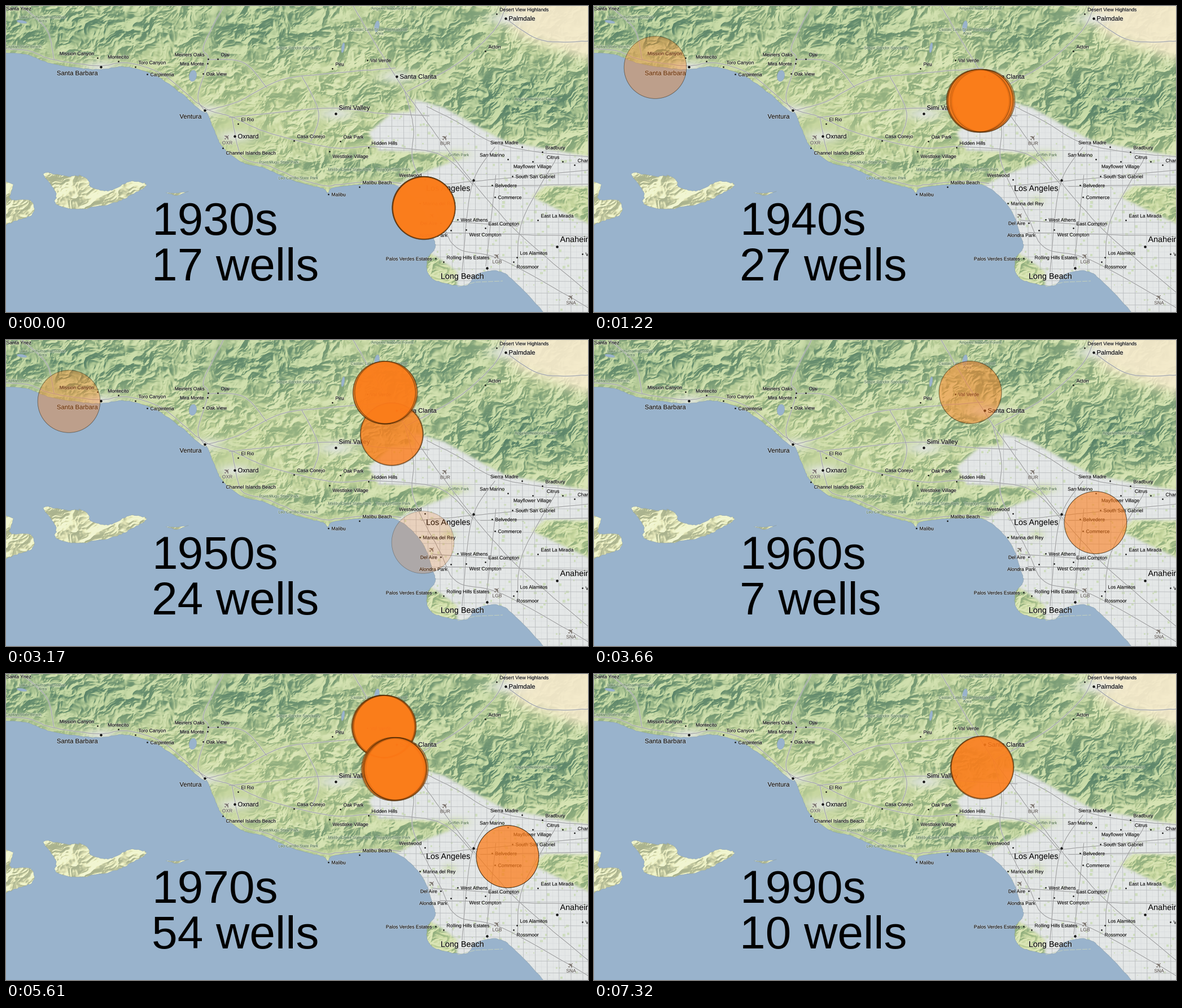
Write a matplotlib script that moves like this. It is 1031x543 px and loops after 8 s.

```python
import numpy as np
import matplotlib.pyplot as plt
from matplotlib.animation import FuncAnimation
from matplotlib.collections import LineCollection, PatchCollection
from matplotlib.patches import Circle, Ellipse, PathPatch
from matplotlib.path import Path
from matplotlib.patheffects import withStroke

W, H, DPI = 1031, 543, 72
TICK, HOLD, TICKS = 20, 61, 400
SEA, SHORE = "#99b3cc", "#8fa5b4"
rng = np.random.default_rng(11)
plt.rcParams["font.family"] = "Liberation Sans"

# Key points only; curves and wobble fill in the rest.
COAST = [
    (-20, 83), (35, 86), (80, 102), (160, 113), (212, 108), (275, 129),
    (346, 186), (356, 190), (368, 218), (384, 251), (420, 278), (458, 288),
    (515, 312), (561, 324), (570, 332), (582, 322), (650, 316), (695, 320),
    (736, 358), (757, 411), (760, 430), (747, 447), (746, 471), (763, 488),
    (808, 497), (823, 490), (832, 477), (870, 470), (901, 489), (958, 550),
]
ISLANDS = [
    [(67, 297), (108, 302), (132, 301), (146, 309), (152, 322), (185, 327),
     (220, 311), (249, 318), (220, 336), (190, 350), (125, 360), (88, 351), (88, 330)],
    [(-15, 318), (12, 317), (8, 342), (44, 345), (47, 369), (12, 383), (-15, 388)],
    [(284, 331), (304, 332), (323, 329), (303, 336)],
]
URBAN = [
    (642, 225), (682, 190), (725, 187), (722, 165), (775, 180), (850, 222),
    (885, 240), (1040, 268), (1040, 320), (955, 318), (930, 338), (1040, 390),
    (1040, 560), (800, 560), (798, 470), (765, 446), (680, 400), (690, 318),
    (725, 300), (810, 268), (770, 260), (660, 256),
]
DESERT = [(858, -30), (900, 52), (1060, 105), (1060, -30)]

HILL_ROADS = [
    [(x + 3, y - 7) for x, y in COAST[:7]] + [(400, 197), (465, 225), (575, 251), (640, 249)],
    [(352, 186), (410, 170), (485, 132), (570, 120), (690, 110)],
    [(395, 198), (470, 190), (580, 181), (660, 190), (750, 195)],
    [(615, 0), (656, 70), (706, 150)],
    [(710, 152), (800, 102), (864, 44), (886, 0)],
    [(352, 186), (340, 160), (358, 95), (350, 72), (385, 0)],
    [(358, 95), (420, 100), (462, 145)],
    [(85, 95), (72, 42), (28, 0)],
    [(524, 124), (554, 189), (540, 240)],
    [(884, 22), (950, 61), (1040, 62)],
    [(400, 197), (412, 255)] + [(x + 5, y - 5) for x, y in COAST[10:18] if x != 570],
]
CITY_ROADS = [
    [(706, 150), (778, 250), (850, 340), (920, 414), (1040, 515)],
    [(706, 150), (722, 215), (722, 280), (769, 376), (800, 430), (880, 451), (1040, 540)],
    [(640, 249), (765, 262), (828, 318)],
    [(745, 178), (800, 206), (860, 241), (940, 259), (1040, 268)],
    [(735, 320), (840, 310), (1040, 290)], [(866, 250), (825, 320), (808, 472)],
    [(868, 300), (850, 462)], [(974, 272), (915, 380), (906, 462)],
    [(768, 402), (1040, 409)], [(755, 380), (907, 391)], [(840, 320), (1040, 316)],
]

# name, dot x, dot y, side of the dot on which the name stands
TOWNS_WEST = [
    ("Santa Ynez", -5, 4, "e"), ("Mission Canyon", 162, 92, "nw"),
    ("Montecito", 199, 98, "n"), ("Toro Canyon", 229, 108, "ne"),
    ("Carpinteria", 250, 121, "e"), ("Meiners Oaks", 358, 94, "nw"),
    ("Mira Monte", 357, 102, "w"), ("Ojai", 375, 94, "ne"),
    ("Oak View", 349, 120, "e"), ("El Rio", 411, 209, "ne"),
    ("Channel Islands Beach", 384, 252, "se"), ("Piru", 578, 111, "ne"),
    ("Val Verde", 640, 96, "e"), ("Acton", 849, 80, "ne"),
    ("Casa Conejo", 510, 239, "ne"), ("Oak Park", 592, 240, "ne"),
    ("Hidden Hills", 642, 251, "ne"), ("Westlake Village", 573, 258, "se"),
    ("Malibu Beach", 626, 321, "ne"), ("Malibu", 571, 334, "e"),
    ("Desert View Highlands", 869, 14, "ne"),
]
TOWNS_EAST = [
    ("Westwood", 742, 308, "nw"), ("Sierra Madre", 914, 250, "nw"),
    ("Bradbury", 950, 259, "ne"), ("Citrus", 986, 276, "nw"),
    ("San Marino", 889, 272, "nw"), ("Mayflower Village", 933, 276, "s"),
    ("South San Gabriel", 897, 302, "e"), ("Belvedere", 861, 318, "e"),
    ("Commerce", 866, 339, "e"), ("Marina del Rey", 733, 350, "e"),
    ("Del Aire", 770, 385, "w"), ("West Athens", 800, 379, "e"),
    ("East Compton", 849, 394, "ne"), ("Alondra Park", 788, 398, "sw"),
    ("West Compton", 815, 397, "se"), ("East La Mirada", 942, 380, "ne"),
    ("Los Alamitos", 905, 446, "ne"), ("Rossmoor", 899, 454, "se"),
    ("Rolling Hills Estates", 775, 454, "ne"), ("Palos Verdes Estates", 761, 448, "w"),
    ("Charter Oak", 1007, 282, "ne"), ("Villa Park", 1021, 440, "e"),
]
CITIES = [
    ("Santa Barbara", 168, 108, "sw"), ("Ventura", 352, 185, "sw"),
    ("Oxnard", 405, 231, "e"), ("Simi Valley", 584, 191, "ne"),
    ("Santa Clarita", 692, 125, "e"), ("Palmdale", 885, 22, "e"),
]
METROS = [("Los Angeles", 828, 309, "sw"), ("Long Beach", 852, 465, "sw"),
          ("Anaheim", 976, 427, "ne")]
PARKS = [
    ("Lake Cachuma Recreation\nArea", 65, 23), ("Capitan State Beach", 31, 72),
    ("Angeles National Forest", 685, 4), ("Angeles National Forest", 939, 165),
    ("Castaic Lake State Recreational\nArea", 661, 45),
    ("Sespe Condor Sanctuary", 518, 74), ("Point Mugu State Park", 484, 277),
    ("Leo Carrillo State Park", 518, 305), ("Malibu Creek State Park", 609, 290),
    ("Topanga State Park", 686, 290), ("Griffith Park", 802, 264),
]
AIRPORTS = [("OXR", 392, 242), ("BUR", 778, 243), ("LGB", 870, 453),
            ("SNA", 1001, 526), ("", 755, 381)]

# Per decade from 1930: stacks of wells (x, y, count, sideways spread)
STACKS = [
    [(740, 358.5, 17, 0.6)],
    [(108.5, 109, 2, 0), (685, 168.2, 25, 3.2)],
    [(111.5, 109, 2, 0), (738.5, 359, 1, 0), (683, 167, 7, 0.7), (671.5, 93.5, 14, 2)],
    [(666.5, 93, 3, 0.2), (888.5, 324, 4, 0)],
    [(888.5, 324, 6, 0), (669.5, 93.5, 22, 1.6), (688.5, 168.8, 26, 2.6)],
    [(739.5, 359, 2, 0), (688, 166, 5, 2.4)],
    [(688, 166, 10, 0.9)],
]


# ------------------------------------------------------------------ helpers
def curve(pts, wobble=0.0, closed=False, n=10):
    """Catmull-Rom line through the points, with a little seeded wobble."""
    p = np.array(pts, float)
    ends = (p[-1:], p[:2]) if closed else (p[:1], p[-1:])
    p = np.vstack([ends[0], p, ends[1]])
    a, b, c, d = p[:-3], p[1:-2], p[2:-1], p[3:]
    t = np.linspace(0, 1, n, endpoint=False)[:, None, None]
    q = 0.5 * (2 * b + (c - a) * t + (2 * a - 5 * b + 4 * c - d) * t**2
               + (3 * b - a - 3 * c + d) * t**3)
    q = q.transpose(1, 0, 2).reshape(-1, 2)
    q = q + rng.normal(0, wobble, q.shape)
    return q if closed else np.vstack([q, p[-1:]])


def noise(x, y, scale):
    g = rng.random((128, 128))
    u, v = x / scale + 7, y / scale + 7
    i, j = np.floor(u).astype(int), np.floor(v).astype(int)
    fu, fv = (f**3 * (f * (6 * f - 15) + 10) for f in (u - i, v - j))
    at = lambda dj, di: g[(j + dj) % 128, (i + di) % 128]
    top = at(0, 0) + fu * (at(0, 1) - at(0, 0))
    low = at(1, 0) + fu * (at(1, 1) - at(1, 0))
    return top + fv * (low - top)


def blur(a, s):
    pad = int(3 * s)
    b = np.pad(a, pad, mode="edge")
    fy = np.fft.fftfreq(b.shape[0])[:, None]
    fx = np.fft.rfftfreq(b.shape[1])[None, :]
    b = np.fft.irfft2(np.fft.rfft2(b) * np.exp(-2 * (np.pi * s) ** 2 * (fx**2 + fy**2)), b.shape)
    return b[pad:-pad, pad:-pad]


def blobs(items):
    out = np.zeros((H, W))
    for cx, cy, rx, ry, amp in items:
        out = np.maximum(out, amp * np.exp(-(((xx - cx) / rx) ** 2 + ((yy - cy) / ry) ** 2)))
    return out


def inside(poly, soft):
    pts = np.column_stack([xx.ravel(), yy.ravel()])
    mask = Path(poly).contains_points(pts).reshape(H, W).astype(float)
    return np.clip(blur(mask, soft), 0, 1)


def mix(a, b, t):
    t = np.clip(t, 0, 1)[..., None]
    return np.asarray(a, float) * (1 - t) + np.asarray(b, float) * t


yy, xx = np.mgrid[0:H, 0:W].astype(float)


def valleys():
    """Soft strips of flat ground that follow the hill roads."""
    mark = np.zeros((H, W))
    for road in HILL_ROADS:
        x, y = curve(road, n=60).astype(int).T
        ok = (x >= 0) & (x < W) & (y >= 0) & (y < H)
        mark[y[ok], x[ok]] = 1
    return np.clip(blur(mark, 6) * 12, 0, 0.75)


def relief():
    """Shaded terrain with green hills, pale towns and cream desert."""
    urban, desert = inside(URBAN, 2.5), inside(DESERT, 10)
    high = blobs([(120, 40, 260, 48, 0.9), (440, 35, 190, 65, 0.8),
                  (920, 165, 160, 65, 1), (765, 50, 110, 65, 0.65),
                  (640, 287, 150, 22, 0.5), (650, 160, 70, 25, 0.35)])
    town = blobs([(x, y, 30, 11, 0.8) for _, x, y, _ in CITIES])
    plain = np.maximum(valleys(), blobs([(405, 225, 50, 45, 1)]))
    rough = 1 - np.maximum.reduce([plain, town, 0.97 * urban, 0.92 * desert])
    rough = np.clip(rough, 0.03, 1)

    wx = xx + 18 * (noise(xx, yy, 34) - 0.5) + 8 * (noise(xx, yy, 12) - 0.5)
    wy = yy + 18 * (noise(xx, yy, 34) - 0.5) + 8 * (noise(xx, yy, 12) - 0.5)
    height = np.zeros((H, W))
    for k, scale in enumerate(46 * 0.58 ** np.arange(5)):
        c, s = np.cos(0.6 * k + 0.3), np.sin(0.6 * k + 0.3)
        n = noise(c * wx - s * 1.25 * wy, s * wx + c * 1.25 * wy, scale)
        height += 0.55 * scale * (1 - np.abs(2 * n - 1))
    gy, gx = np.gradient(height)
    shade = np.tanh(0.8 * (gx + gy)) * rough

    base = mix((197, 213, 157), (146, 178, 132), high)
    dark = mix((146, 175, 127), (84, 127, 103), high)
    lite = mix((222, 232, 186), (196, 217, 164), high)
    img = base + (dark - base) * np.clip(-shade, 0, 1)[..., None]
    img += (lite - base) * np.clip(shade, 0, 1)[..., None]

    relit = (1 + 0.2 * shade)[..., None]
    img = mix(img, np.clip(np.array((232, 226, 190)) * relit, 0, 255),
              0.6 * ((xx < 340) & (yy > 290)))
    img = mix(img, np.clip(np.array((240, 231, 200)) * relit, 0, 255), desert)
    img = mix(img, (228, 231, 231), np.maximum(urban, town))
    img = mix(img, (205, 220, 172), blobs([(797, 263, 22, 9, 0.9), (785, 345, 13, 9, 0.7)]))
    return img / 255


def stage(fig):
    ax = fig.add_axes([0, 0, 1, 1])
    ax.set(xlim=(0, W), ylim=(H, 0))
    ax.axis("off")
    return ax


def draw_streets(ax):
    city = Path(URBAN)
    for step, color, width in [(10.5, "#d6d9db", 0.5), (21, "#b9bcbe", 0.8)]:
        streets = [[(x, 0), (x + 4, H)] for x in np.arange(640, W, step)]
        streets += [[(600, y), (W, y + 3)] for y in np.arange(150, H, step)]
        grid = LineCollection(streets, colors=color, linewidths=width)
        ax.add_collection(grid, autolim=False)
        grid.set_clip_path(city, ax.transData)
    spots = rng.uniform((640, 170), (W, H), (420, 2))
    spots = spots[city.contains_points(spots)]
    ax.scatter(*spots.T, s=rng.uniform(3, 26, len(spots)), marker="s",
               color="#c9dbb4", linewidths=0, alpha=0.8)
    lines = [curve(r, 0.2) for r in HILL_ROADS + CITY_ROADS]
    for color, width in [((1, 1, 1, 0.45), 2.6), ("#a0a2a3", 1.3)]:
        ax.add_collection(LineCollection(lines, colors=color, linewidths=width), autolim=False)


def draw_land(ax):
    img = relief()
    ground = dict(extent=(0, W, H, 0), aspect="auto", interpolation="nearest")
    ax.imshow(img, **ground)
    for x, y, w, h in [(331, 124, 13, 20), (597, 74, 5, 18), (657, 36, 8, 20), (28, 28, 18, 5)]:
        ax.add_patch(Ellipse((x, y), w, h, angle=10, fc=SEA, ec=SHORE, lw=0.5))
    draw_streets(ax)
    # The sea covers whatever runs past the shore.
    sea = Path(np.vstack([curve(COAST, 0.4), [(-20, H + 20)]]))
    ax.add_patch(PathPatch(sea, fc=SEA, ec=SHORE, lw=0.7, zorder=2.5))
    for pts in ISLANDS:
        ring = curve(pts, 0.6, closed=True)
        ring = Path(np.vstack([ring, ring[:1]]), closed=True)
        ax.imshow(img, zorder=2.6, **ground).set_clip_path(ring, ax.transData)
        ax.add_patch(PathPatch(ring, fc="none", ec=SHORE, lw=0.6, zorder=2.7))
    ax.plot([800, 832, 880], [498, 490, 488], color="#c3d0bd", lw=1, ls=(0, (9, 2)), zorder=2.7)


def label(ax, text, x, y, size, color="#111111", **kw):
    kw = {"ha": "center", **kw}
    ax.text(x, y, text, fontsize=size, color=color, va="center_baseline",
            path_effects=[withStroke(linewidth=1.6, foreground=(1, 1, 1, 0.35))], **kw)


def place(ax, name, x, y, side, size, dot):
    ax.scatter(x, y, s=dot, color="#111111", linewidths=0, zorder=3)
    across = ("e" in side) - ("w" in side)
    down = ("s" in side) - ("n" in side)
    label(ax, name, x + 5.5 * across, y + 0.95 * size * down, size,
          ha=["center", "left", "right"][across])


def draw_map(fig):
    ax = stage(fig)
    draw_land(ax)
    for text, x, y in PARKS:
        label(ax, text, x, y, 7, "#5c7a56", linespacing=0.95)
    for text, x, y in AIRPORTS:
        label(ax, text, x, y, 8.5, "#66615c")
        label(ax, "\u2708", x, y - 12, 14, "#77706a", rotation=45, family="DejaVu Sans")
    for group, size, dot in [(TOWNS_WEST, 8.6, 7), (TOWNS_EAST, 8.6, 7),
                             (CITIES, 11.3, 20), (METROS, 14.4, 20)]:
        for town in group:
            place(ax, *town, size, dot)
    ax.set(xlim=(0, W), ylim=(H, 0))


def wells_layer(ax, stacks):
    rings = []
    for x, y, count, spread in stacks:
        shift = rng.normal(0, 1, (count, 2)).clip(-1.7, 1.7) * (spread, min(spread, 0.7))
        rings += [Circle((x + dx, y + dy), 55.3, fc=(1, 0.49, 0.1, 0.2),
                         ec=(0.1, 0.07, 0, 0.3), lw=0.8) for dx, dy in shift]
    layer = PatchCollection(rings, match_original=True, visible=False)
    ax.add_collection(layer, autolim=False)
    return layer


# ---------------------------------------------------------------- animation
fig = plt.figure(figsize=(W / DPI, H / DPI), dpi=DPI, facecolor=SEA)
draw_map(fig)
fig.canvas.draw()
backdrop = np.array(fig.canvas.buffer_rgba())
fig.clear()

# The still map is kept as one picture so each redraw stays quick.
fig.figimage(backdrop, zorder=-1)
ax = stage(fig)
layers = [wells_layer(ax, stacks) for stacks in STACKS]
title, total = (ax.text(258.5, y, "", fontsize=82, color="black") for y in (406, 487))


def update(tick):
    now = min(tick // HOLD, len(STACKS) - 1)
    for k, layer in enumerate(layers):
        layer.set_visible(k == now)
    title.set_text(f"{1930 + 10 * now}s")
    total.set_text(f"{sum(stack[2] for stack in STACKS[now])} wells")
    return [*layers, title, total]


anim = FuncAnimation(fig, update, frames=TICKS, init_func=lambda: update(0),
                     interval=TICK, repeat=True, cache_frame_data=False)
plt.show()
```
